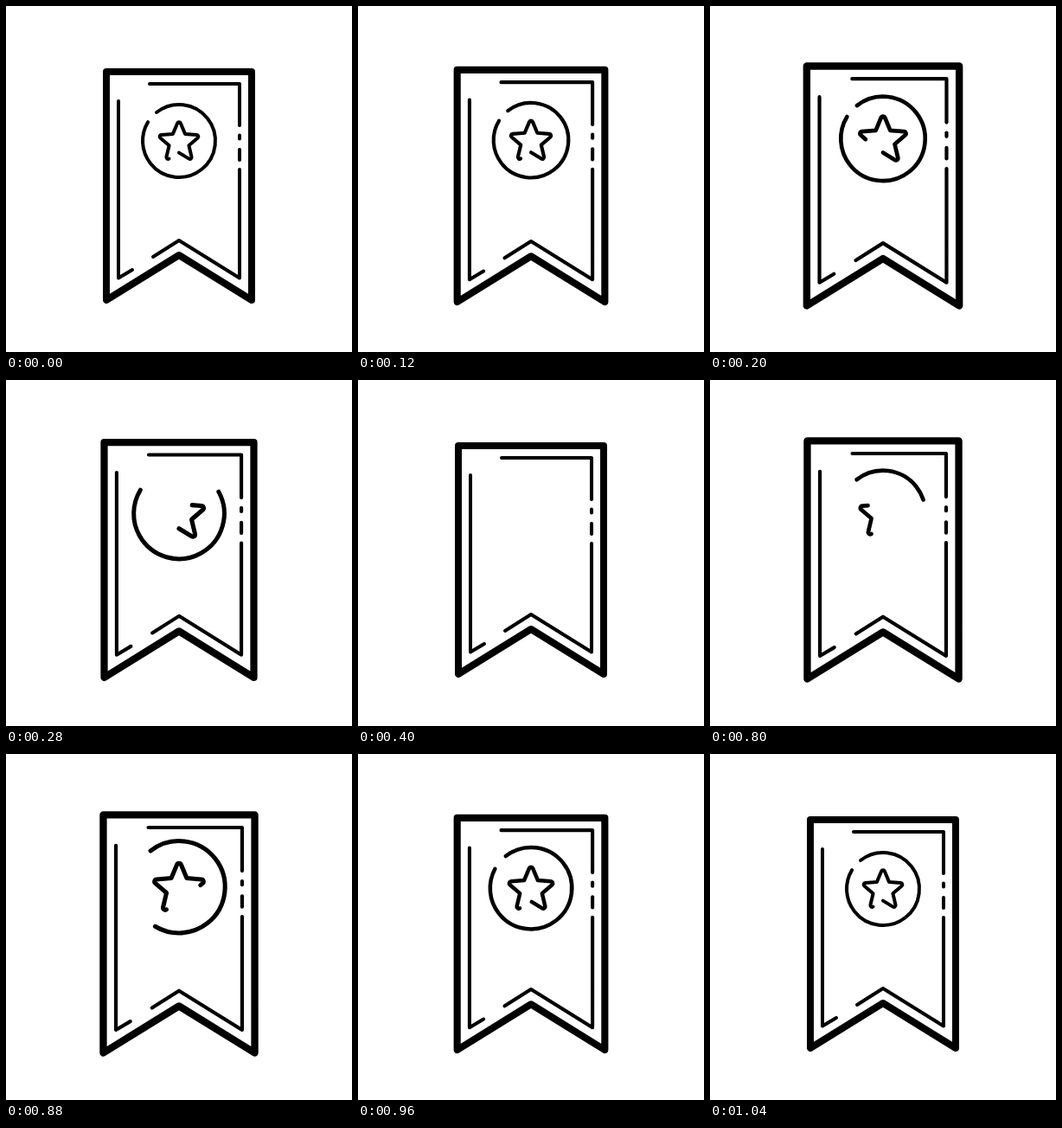
An HTML page with a canvas that plays this animation: 400x400 px, repeating every 1.12 s.

```html
<!DOCTYPE html>
<html lang="en">
<head>
<meta charset="utf-8">
<title>Bookmark badge</title>
<style>
  html, body { margin: 0; width: 100%; height: 100%; overflow: hidden; background: #fff; }
  canvas { display: block; }
</style>
</head>
<body>
<canvas id="stage" width="400" height="400"></canvas>
<script>
const ctx = document.getElementById('stage').getContext('2d');
const LOOP = 1120, TICK = 40, STEPS = 8;
const HIDE_AT = 2, SHOW_AT = 18;
const RAD = Math.PI / 180;
const STAR_LEN = 146;

const clamp = (v, lo, hi) => Math.min(hi, Math.max(lo, v));
const ease = (k, a, b) => {
  const p = clamp((k - a) / (b - a), 0, 1);
  return p * p * (3 - 2 * p);
};
// Rises from a to its peak, then falls to b.
const hump = (k, a, peak, b) => k < peak ? ease(k, a, peak) : 1 - ease(k, peak, b);

// Coordinates relative to the ribbon centre (200, 208).
const outline = [[-84, -132], [84, -132], [84, 132], [0, 80], [-84, 132]];
const details = [
  [[-34, -118], [70, -118], [70, -70]],
  [[70, -58.5], [70, -54.5]],
  [[70, -42], [70, -30]],
  [[70, -19], [70, 106.5], [0, 63], [-30, 82]],
  [[-70, -98], [-70, 106.5], [-54, 97]]
];

function polyline(points, width, close) {
  ctx.beginPath();
  points.forEach(([x, y]) => ctx.lineTo(x, y));
  if (close) ctx.closePath();
  ctx.lineWidth = width;
  ctx.stroke();
}

function starPoint(i) {
  const r = i % 2 ? 12 : 26.6;
  const a = (126 + 36 * i) * RAD;
  return [r * Math.cos(a), 1.6 + r * Math.sin(a)];
}

function drawStar(from, to, scale) {
  if (to - from < 0.001) return;
  ctx.save();
  ctx.scale(scale, scale);
  const [x0, y0] = starPoint(0), [x9, y9] = starPoint(9);
  ctx.beginPath();
  ctx.moveTo(x0 + (x9 - x0) * 0.26, y0 + (y9 - y0) * 0.26);
  for (let i = 0; i < 9; i++) {
    const next = starPoint(i + 1);
    if (i % 2) ctx.lineTo(...starPoint(i));
    else ctx.arcTo(...starPoint(i), ...next, 2);
  }
  ctx.lineTo(x9, y9);
  if (from > 0 || to < 1) {
    ctx.setLineDash([(to - from) * STAR_LEN, 2 * STAR_LEN]);
    ctx.lineDashOffset = -from * STAR_LEN;
  }
  ctx.lineWidth = 4;
  ctx.stroke();
  ctx.restore();
}

function drawRing(from, to, scale) {
  if (to - from < 0.001) return;
  const start = -128.2, sweep = 339.6;
  ctx.beginPath();
  ctx.arc(0, 0, 42 * scale, (start + sweep * from) * RAD, (start + sweep * to) * RAD);
  ctx.lineWidth = 4 * scale;
  ctx.stroke();
}

function draw(time) {
  const tick = Math.floor((time % LOOP) / TICK);
  const showing = tick >= SHOW_AT;
  const k = clamp(tick - (showing ? SHOW_AT : HIDE_AT), 0, STEPS);
  const size = 1 + 0.05 * hump(k, 0, STEPS / 3, STEPS);

  ctx.setTransform(1, 0, 0, 1, 0, 0);
  ctx.fillStyle = '#fff';
  ctx.fillRect(0, 0, 400, 400);
  ctx.strokeStyle = '#000';
  ctx.lineCap = ctx.lineJoin = 'round';

  ctx.translate(200, 208);
  ctx.scale(size, size);
  polyline(outline, 8, true);
  details.forEach(d => polyline(d, 4));

  ctx.translate(0, -52);
  if (showing) {
    if (k === 0) return;
    const grow = 1 + 0.215 * hump(k, -0.4, 4, STEPS);
    drawRing(0, ease(k, -0.7, 6.4), grow);
    drawStar(0, ease(k, -0.5, 6.6), grow);
  } else {
    drawRing(ease(k, 3.33, STEPS), 1, 1 + 0.25 * ease(k, 0, 6.7));
    drawStar(ease(k, 1.2, STEPS), 1, 1 + 0.25 * ease(k, 0, 5.8));
  }
}

const began = performance.now();
function loop() {
  draw(performance.now() - began);
  requestAnimationFrame(loop);
}
loop();
</script>
</body>
</html>
```
